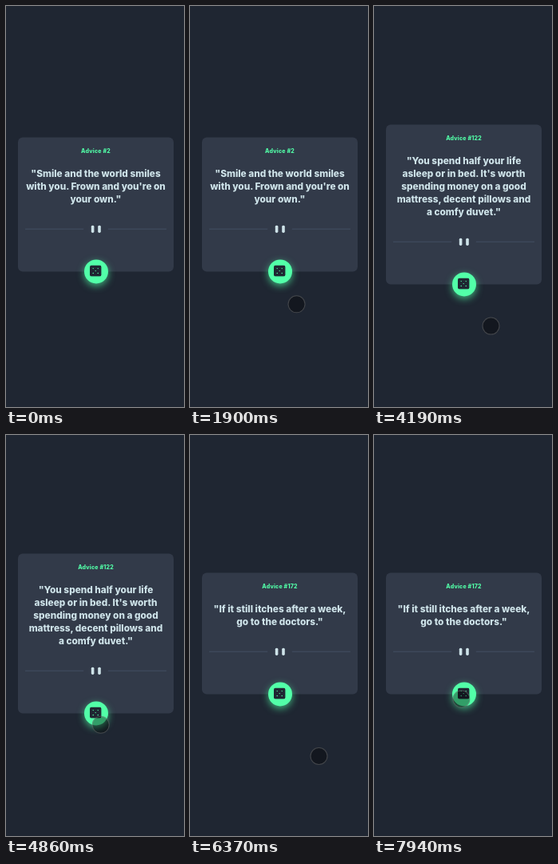
An HTML page for the animation above (8 s loop, 223 by 502 pixels).

```html
<!DOCTYPE html>
<html lang="en">
<head>
<meta charset="utf-8">
<title>Advice card</title>
<style>
html, body { margin: 0; width: 100%; height: 100%; overflow: hidden; background: #1f2632; }
body { display: flex; align-items: center; box-sizing: border-box; padding: 0 0 6px 15px;
  font-family: Inter, "Open Sans", sans-serif; font-weight: 800; text-align: center; }
#card { position: relative; box-sizing: border-box; width: 195px; padding: 37.7px 0 82.3px;
  border-radius: 6px; background: #323a49; transform: translateY(.4px); }
#title { position: absolute; top: 13px; width: 100%; font-size: 7px; line-height: 10px; letter-spacing: .2px; color: #52ffa8; }
#quote { font-size: 11.8px; line-height: 16px; white-space: pre; color: #cee3e9; }
#rule { position: absolute; left: 9px; bottom: 48px; width: 177px; height: 9.6px; }
#dice { position: absolute; left: 82.5px; bottom: -15px; width: 30px; height: 30px; border-radius: 50%;
  background: #52ffa8; box-shadow: 0 3px 10px rgba(82, 255, 168, .65); }
#dice svg { position: absolute; left: 7.8px; top: 6.8px; width: 14.4px; height: 14.4px; }
#cursor { position: absolute; left: -11px; top: -11px; width: 22px; height: 22px; box-sizing: border-box;
  border-radius: 50%; border: 1.5px solid rgba(145, 145, 145, .38); background: rgba(0, 0, 0, .38); }
</style>
</head>
<body>
<div id="card">
  <div id="title"></div>
  <div id="quote"></div>
  <svg id="rule" viewBox="0 0 295 16">
    <path d="M0 8H122M173 8H295" stroke="#4f5d74"/>
    <g fill="#cee3e9"><rect x="138" width="6" height="16" rx="3"/><rect x="152" width="6" height="16" rx="3"/></g>
  </svg>
  <div id="dice">
    <svg viewBox="0 0 24 24">
      <rect width="24" height="24" rx="4" fill="#1f2632"/>
      <path d="M7 7h0M17 7h0M12 12h0M7 17h0M17 17h0" stroke="#52ffa8" stroke-width="2.4" stroke-linecap="round"/>
    </svg>
  </div>
</div>
<div id="cursor"></div>
<script>
const LOOP = 8000;
const $ = id => document.getElementById(id);

const advice = [
  { at: 0, id: 2, text: '"Smile and the world smiles\nwith you. Frown and you\'re on\nyour own."' },
  { at: 2440, id: 122, text: '"You spend half your life\nasleep or in bed. It\'s worth\nspending money on a good\nmattress, decent pillows and\na comfy duvet."' },
  { at: 6170, id: 172, text: '"If it still itches after a week,\ngo to the doctors."' }
];

// The cursor rests between these straight moves
const entry = { at: 260, x: 186, y: 500 };
const moves = [
  { from: 260, to: 830, x: 108, y: 334 },
  { from: 970, to: 1030, x: 113, y: 337 },
  { from: 1600, to: 2170, x: 152, y: 406 },
  { from: 3450, to: 3580, x: 151, y: 416 },
  { from: 3720, to: 3850, x: 149, y: 404 },
  { from: 4130, to: 5070, x: 110, y: 351 },
  { from: 5250, to: 5350, x: 112, y: 348 },
  { from: 5700, to: 6300, x: 161.5, y: 402 },
  { from: 7040, to: 7940, x: 109.5, y: 330.5 }
];

function cursorAt(t) {
  let { x, y } = entry;
  for (const m of moves) {
    const k = Math.min(1, Math.max(0, (t - m.from) / (m.to - m.from)));
    x += (m.x - x) * k;
    y += (m.y - y) * k;
  }
  return [x, y];
}

function draw(t) {
  const { id, text } = advice.findLast(a => a.at <= t);
  $('title').textContent = 'Advice #' + id;
  $('quote').textContent = text;
  const [x, y] = cursorAt(t);
  $('cursor').hidden = t < entry.at;
  $('cursor').style.transform = `translate(${x}px, ${y}px)`;
}

let start;
function tick(now) {
  start ??= now;
  draw((now - start) % LOOP);
  requestAnimationFrame(tick);
}
draw(0);
requestAnimationFrame(tick);
</script>
</body>
</html>
```
